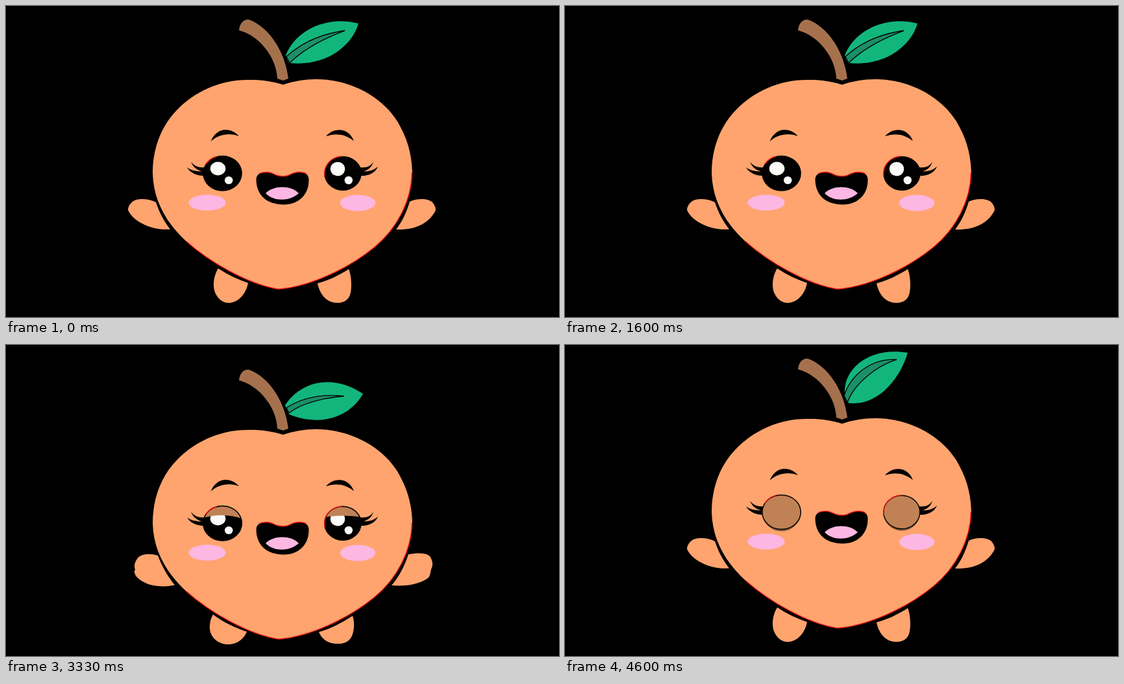
An HTML page that plays this animation: 852x480 px, repeating every 4.67 s.

```html
<!DOCTYPE html>
<html lang="en">
<head>
<meta charset="utf-8">
<title>Bouncing peach</title>
<style>
  html, body { margin: 0; width: 100%; height: 100%; overflow: hidden; background: #000; }
  svg { display: block; width: 852px; height: 480px; }
  .skin { fill: #ffa46e; }
  .stem { fill: #a5714d; }
  .leaf { fill: #12b67c; }
  .vein { fill: #1b8f68; stroke: #000; stroke-width: 1.4; }
  .pink { fill: #fcb7e2; }
  .shine { fill: #fbfaf7; }
  .lid { fill: #c08255; }
  .rim { fill: none; stroke: #000; stroke-width: 1.5; }
  .red { fill: none; stroke: #f01414; stroke-width: 1.4; }
</style>
</head>
<body>
<svg viewBox="0 0 852 480">
  <defs>
    <clipPath id="eyes">
      <ellipse cx="333.5" cy="258" rx="29.5" ry="26.5"/>
      <ellipse cx="518.8" cy="258" rx="28" ry="25.8"/>
    </clipPath>
  </defs>
  <path id="limbs" class="skin"/>
  <g id="peach">
    <path class="stem" d="M374 21C405 32 430 70 435 112L427 115L418 112C417 80 391 46 359 37.5C360 27 366 20 374 21Z"/>
    <path id="leaf" class="leaf"/>
    <path id="vein" class="vein"/>
    <path class="skin" d="M427 121.5C410 116 392 113.5 373 114C330 114 290 132 262 162C238 187 226 222 226 258C227 298 245 333 277.5 363C315 396.5 374 430 420 437C469 433 528 405 568 372C603 343 625 300 626 257C625 225 617 202 603 178C578 138 528 113 478 113C460 113 443 116 427 121.5Z"/>
    <path class="red" d="M277.5 363C315 396.5 374 430 420 437C469 433 528 405 568 372C603 343 625 300 625.5 257"/>

    <path d="M315.5 209C325 186 347 187 359 201C345 195 327 198 315.5 209ZM493 201C505 187 528 187 536 208.5C523 197 507 196 493 201Z"/>
    <path d="M306 256C296 255 288 249 285 240.5C290 247 297 250 308 249ZM304 262C294 262 283 257 279 249C285 254 295 256 304 255ZM546 249C556 250 562 247 566 240.5C564 249 555 256 546 256ZM546 255C558 256 567 254 573 247.5C570 257 558 263 546 262Z"/>

    <g id="open">
      <ellipse cx="333.5" cy="258.3" rx="30.3" ry="27.5"/>
      <ellipse cx="519" cy="258.3" rx="28.8" ry="26.6"/>
      <g class="shine">
        <ellipse cx="326.5" cy="251" rx="11.8" ry="10.4"/>
        <ellipse cx="343.2" cy="269" rx="6.3" ry="6"/>
        <ellipse cx="511" cy="251.5" rx="11.2" ry="10.8"/>
        <ellipse cx="527.8" cy="269" rx="6.2" ry="6.2"/>
      </g>
    </g>
    <g id="shade" fill="#85593f">
      <ellipse cx="333.5" cy="260.5" rx="29" ry="27"/>
      <ellipse cx="519" cy="260.3" rx="27.5" ry="26.5"/>
    </g>
    <g clip-path="url(#eyes)"><path id="lids" class="lid"/></g>
    <g id="rims" class="rim">
      <ellipse cx="333.5" cy="258" rx="29.7" ry="26.6"/>
      <ellipse cx="518.8" cy="258" rx="28" ry="25.8"/>
    </g>
    <path class="red" d="M308 244Q314 235 324 232.5M491 264C489 246 501 233 517 232"/>

    <path d="M385.5 268C385.5 259 393 256 402 256.5C409 256.5 413 260 418 261.5C423 263 430 263 435 261.5C440 259 444 256.5 452 256.5C462 256.5 467 261 466.5 269C466.5 291 451 306.5 428 306.5C401 306 386 292 385.5 268Z"/>
    <path class="red" d="M390 259Q394 256.5 402 256.5C409 256.5 413 260 418 261.5C423 263 430 263 435 261.5C440 259 444 256.5 452 256.5Q460 256.5 463 259.5"/>
    <g class="pink">
      <path d="M400 289C412 277 438 276 451 289C437 302 412 302 400 289Z"/>
      <ellipse cx="310" cy="303.5" rx="28.5" ry="12.3"/>
      <ellipse cx="542" cy="304" rx="27.3" ry="12.5"/>
    </g>
  </g>
</svg>
<script>
  const LOOP = 4670, HOLD = 200, LEAD = 70;
  const $ = id => document.getElementById(id);

  const limbsUp =
    'M231 303C220 297 202 296 195 302C190 306 188 311 188 315C196 333 225 347 253 344.5C243 332 236 318 231 303Z' +
    'M622 302C632 297 650 296 657 303C661 308 662 311 662 315C652 336 630 346 601 345C611 332 617 318 622 302Z' +
    'M327 405C320 416 318 432 322 442C328 456 338 459 346 458C360 456 370 443 373 427.5C357 422 342 415 327 405Z' +
    'M528 406C532 415 533 432 531 442C529 455 518 459 508 458C493 457 483 444 480 428C497 423 513 416 528 406Z';
  const legsDown =
    'M319 416C314 424 312 438 316 446C321 458 335 463 345 462C357 461 367 453 371 442.5C352 436 335 428 319 416Z' +
    'M534 418C537 427 537 439 533 449C528 460 517 462 507 461C495 460 486 453 482 443C500 438 517 429 534 418Z';
  const armsDown =
    'M234 325C222 321 207 322 202 330C198 336 197 341 199 347C196 350 199 357 206 362C219 372 240 375 260 370.5C249 357 241 343 234 325Z' +
    'M620 323C632 321 647 320 653 326C658 333 658 341 655 346C654 350 654 355 651 359C638 369 618 373 594 371C606 357 614 341 620 323Z';
  const armsOut =
    'M234 325C221 319 203 320 195 327C189 332 187 338 188 343C193 361 230 375 260 370.5C249 357 241 343 234 325Z' +
    'M620 323C635 318 662 317 672 324C678 328 680 334 679 339C672 360 630 374 594 371C606 357 614 341 620 323Z';

  const leafMid = {
    leaf: 'M431 76C445 40 490 14 543 27C533 62 492 94 437 88Q433 85 431 76Z',
    vein: 'M432 78C455 57 485 43 522 38C490 50 460 65 437 88Z'
  };
  const leafLow = {
    leaf: 'M430 76C452 42 500 25 550 58.5C527 98 480 108 436 90Z',
    vein: 'M432 80C455 65 485 58 521 62C490 64 455 73 436 88Z'
  };
  const leafHigh = {
    leaf: 'M431 76C428 36 470 2 528 12C515 55 480 95 437 89.5Q432 86 431 76Z',
    vein: 'M430 78C440 48 470 20 511 22.5C480 32 445 60 435 89Z'
  };

  // Lower edge of both eyelids, gently arched
  const lids = y => `M300 225V${y + 4}Q333 ${y - 7} 367 ${y + 5}V225ZM488 225V${y + 2}Q519 ${y - 3} 550 ${y + 2}V225Z`;

  const poses = [
    { dy: 0, limbs: limbsUp, ...leafMid, lid: 0 },
    { dy: 17, limbs: armsDown + legsDown, ...leafLow, lid: 247 },
    { dy: 17, limbs: armsOut + legsDown, ...leafMid, lid: 263 },
    { dy: 0, limbs: limbsUp, ...leafHigh, lid: 300 }
  ];

  function show(p) {
    const shut = p.lid > 285;
    $('peach').setAttribute('transform', `translate(0 ${p.dy})`);
    $('limbs').setAttribute('d', p.limbs);
    $('leaf').setAttribute('d', p.leaf);
    $('vein').setAttribute('d', p.vein);
    $('lids').setAttribute('d', p.lid ? lids(p.lid) : '');
    $('open').style.display = shut ? 'none' : '';
    $('shade').style.display = shut ? '' : 'none';
    $('rims').style.display = p.lid ? '' : 'none';
  }

  let current;
  function tick() {
    const t = performance.now() % LOOP;
    const next = poses[Math.floor((t + LEAD) / HOLD) % poses.length];
    if (next !== current) show(current = next);
    requestAnimationFrame(tick);
  }
  tick();
</script>
</body>
</html>
```
